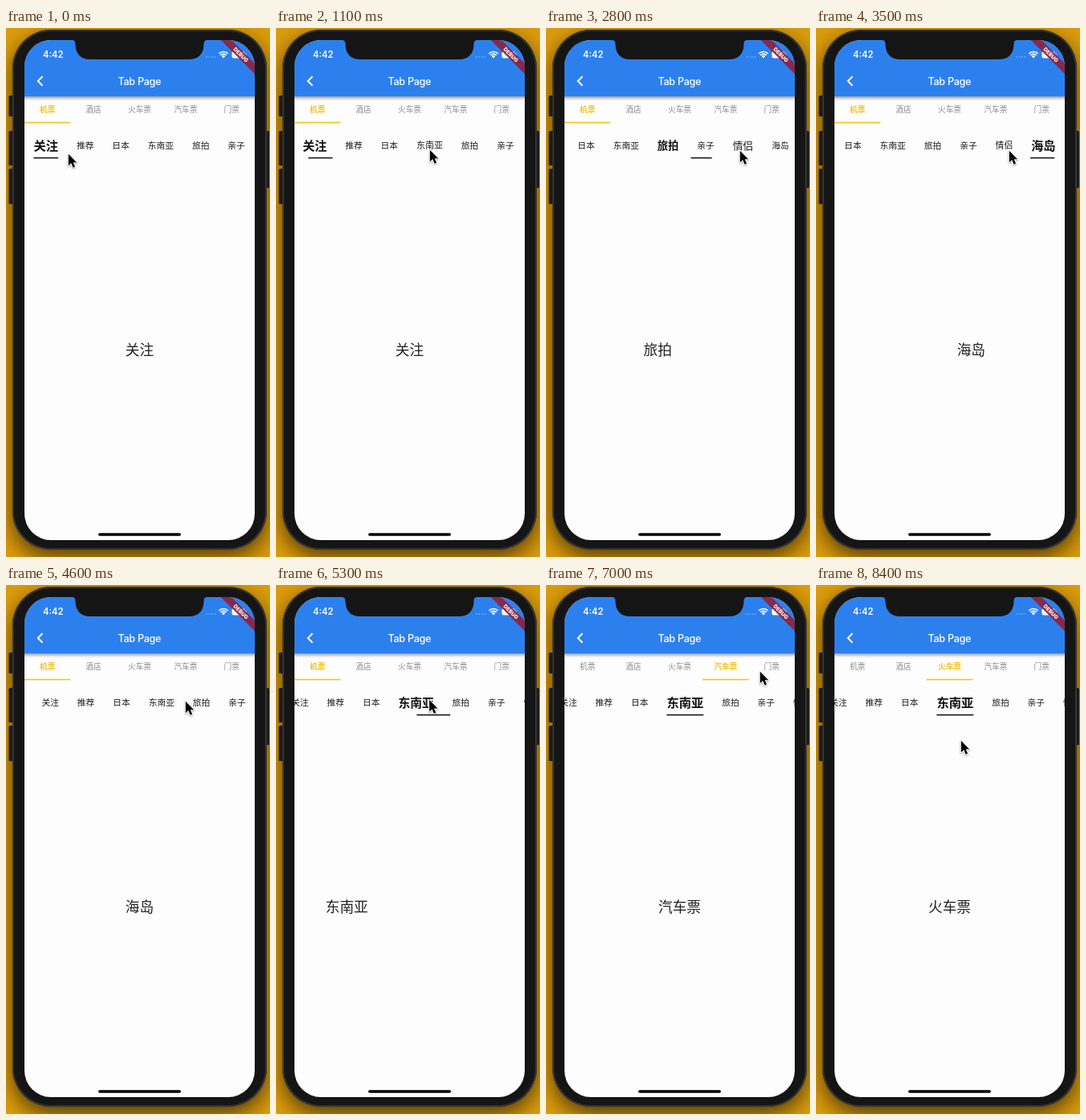
These frames come from a looping animation (329x658 px, 8500 ms). An HTML page with a canvas:

```html
<!DOCTYPE html>
<html lang="zh-CN">
<head>
<meta charset="utf-8">
<title>Tab Page</title>
<style>
html, body { margin: 0; width: 100%; height: 100%; overflow: hidden; background: #d4950c; }
canvas { display: block; width: 329px; height: 658px; }
</style>
</head>
<body>
<canvas id="stage"></canvas>
<script>
const W = 329, H = 658, LOOP = 8500, STEP = 100;
const canvas = document.getElementById('stage');
const ctx = canvas.getContext('2d');
const dpr = window.devicePixelRatio || 1;
canvas.width = W * dpr;
canvas.height = H * dpr;

const CJK = '"Noto Sans CJK SC", "Noto Sans CJK", sans-serif';
const LATIN = 'Inter, Roboto, sans-serif';
const SCREEN = { x: 23, y: 15, w: 287, h: 622, r: 33 };
const MID = SCREEN.x + SCREEN.w / 2;
const TOP = ['机票', '酒店', '火车票', '汽车票', '门票'];
const SUB = ['关注', '推荐', '日本', '东南亚', '旅拍', '亲子', '情侣', '海岛'];
const PAD = 11.45, SMALL = 10.75, BIG = 15.3;
const DURATION = 300, PAGE_LAG = 50;

const taps = [
  { t: 1080, bar: 'sub', i: 3 },
  { t: 2180, bar: 'sub', i: 4 },
  { t: 2720, bar: 'sub', i: 6 },
  { t: 3260, bar: 'sub', i: 7 },
  { t: 5120, bar: 'sub', i: 3 },
  { t: 5795, bar: 'top', i: 2 },
  { t: 6450, bar: 'top', i: 3 },
  { t: 7220, bar: 'top', i: 4 },
  { t: 7790, bar: 'top', i: 2 }
];

// time, x, y
const pointer = [
  [0, 77, 156], [300, 80, 156], [950, 190, 151], [1250, 192, 151],
  [1900, 236, 151], [2100, 237, 151], [2800, 241, 152], [3150, 272, 152],
  [3270, 270, 152], [3500, 240, 152], [4050, 126, 149], [4150, 125, 149],
  [4600, 223, 144], [4750, 223, 145], [5050, 194, 148], [5200, 193, 147],
  [5700, 167, 102], [5850, 168, 101], [6100, 198, 97], [6400, 222, 102],
  [6550, 224, 103], [7000, 266, 107], [7150, 278, 106], [7300, 277, 106],
  [7700, 170, 104], [7900, 168, 106], [8300, 180, 190], [8400, 180, 193], [8500, 180, 193]
];

const clamp = (v, a, b) => Math.min(b, Math.max(a, v));
const lerp = (a, b, p) => a + (b - a) * p;
const smooth = p => p * p * (3 - 2 * p);
const bez = (a, b, s) => 3 * a * s * (1 - s) ** 2 + 3 * b * s * s * (1 - s) + s ** 3;

function ease(x) {
  if (x <= 0) return 0;
  if (x >= 1) return 1;
  let lo = 0, hi = 1;
  for (let n = 0; n < 20; n++) {
    const m = (lo + hi) / 2;
    if (bez(.25, .25, m) < x) lo = m; else hi = m;
  }
  return bez(.1, 1, lo);
}

// Left edges and sizes of the scrolling tabs for given selection weights
function layout(weight) {
  let x = 0;
  return SUB.map((text, i) => {
    const size = lerp(SMALL, BIG, weight(i));
    const w = size * text.length + PAD * 2;
    const tab = { text, x, w, size };
    x += w;
    return tab;
  });
}
const extent = tabs => tabs[tabs.length - 1].x + tabs[tabs.length - 1].w;
const maxScroll = layout(i => i === SUB.length - 1 ? 1 : 0);
const END = extent(maxScroll) - SCREEN.w;

const dragStart = 4150, dragEnd = 4600, settleEnd = 4920;

(function prepare() {
  const at = { sub: 0, top: 0 };
  let scroll = 0, page = SUB[0];
  for (const tap of taps) {
    tap.prev = at[tap.bar];
    tap.dir = Math.sign(tap.i - tap.prev);
    tap.fromText = page;
    page = tap.text = (tap.bar === 'sub' ? SUB : TOP)[tap.i];
    if (tap.bar === 'sub') {
      if (tap.t > dragEnd) scroll = 0;
      const tabs = layout(i => i === tap.prev ? 1 : 0);
      const goal = tabs[tap.i].x + tabs[tap.i].w / 2 - SCREEN.w / 2;
      tap.from = scroll;
      tap.to = scroll = clamp(goal, 0, END);
    }
    at[tap.bar] = tap.i;
  }
})();

const lastTap = (t, bar) => taps.filter(k => k.t <= t && (!bar || k.bar === bar)).pop();

function selection(t, bar) {
  const tap = lastTap(t, bar);
  if (!tap) return { prev: 0, i: 0, p: 1 };
  return { prev: tap.prev, i: tap.i, p: ease((t - tap.t) / DURATION), tap };
}

function scrollAt(t, sel) {
  if (t >= dragStart && t < 5120) {
    if (t <= dragEnd) return lerp(END, -10, smooth((t - dragStart) / (dragEnd - dragStart)));
    return lerp(-10, 0, ease((t - dragEnd) / (settleEnd - dragEnd)));
  }
  return sel.tap ? lerp(sel.tap.from, sel.tap.to, sel.p) : 0;
}

function pointerAt(t) {
  const n = Math.max(1, pointer.findIndex(k => k[0] > t));
  const a = pointer[n - 1], b = pointer[n];
  const p = smooth((t - a[0]) / (b[0] - a[0]));
  return [lerp(a[1], b[1], p), lerp(a[2], b[2], p)];
}

function box(x, y, w, h, r, fill) {
  ctx.beginPath();
  ctx.roundRect(x, y, w, h, r);
  ctx.fillStyle = fill;
  ctx.fill();
}

function label(text, x, y, size, color, weight = 400, family = CJK, align = 'center') {
  ctx.font = `${weight} ${size}px ${family}`;
  ctx.textAlign = align;
  ctx.fillStyle = color;
  ctx.fillText(text, x, y + size * (family === CJK ? .38 : .36));
}

function drawPhone() {
  ctx.fillStyle = '#dc9c0c';
  ctx.fillRect(0, 0, W, H);
  ctx.save();
  ctx.shadowColor = 'rgba(0,0,0,.62)';
  ctx.shadowBlur = 26 * dpr;
  ctx.shadowOffsetY = 9 * dpr;
  box(8, 2, 317, 647, 48, '#2b2b2a');
  ctx.restore();
  for (const [y, h] of [[84, 26], [128, 43], [175, 44]]) box(3.5, y, 6, h, 1.5, '#1d1b18');
  box(323, 128, 5, 71, 1.5, '#1d1b18');
  box(8, 2, 317, 647, 48, '#343433');
  box(10, 4, 313, 643, 46, '#151515');
}

function drawStatus() {
  label('4:42', 46, 33, 11.2, '#fff', 600, LATIN, 'left');
  for (let i = 0; i < 4; i++) box(249 + i * 3.5, 35, 2, 2, 1, 'rgba(255,255,255,.3)');
  ctx.strokeStyle = '#fff';
  ctx.lineWidth = 1.7;
  for (const r of [8, 5.2]) {
    ctx.beginPath();
    ctx.arc(271, 37.5, r, -Math.PI * .75, -Math.PI * .25);
    ctx.stroke();
  }
  ctx.beginPath();
  ctx.moveTo(271, 37.5);
  ctx.arc(271, 37.5, 3.2, -Math.PI * .75, -Math.PI * .25);
  ctx.fillStyle = '#fff';
  ctx.fill();
  box(281.5, 29, 16, 8.5, 2.2, '#fff');
  box(298.3, 31.5, 1.2, 3.4, .6, '#fff');
}

function drawBanner() {
  ctx.save();
  ctx.translate(SCREEN.x + SCREEN.w, SCREEN.y + 1);
  ctx.rotate(Math.PI / 4);
  ctx.fillStyle = 'rgba(140,36,66,.94)';
  ctx.fillRect(-45, 19.8, 90, 9.4);
  label('DEBUG', 0, 24.4, 6.6, '#fff', 800, LATIN);
  ctx.restore();
}

function drawHeader() {
  ctx.save();
  ctx.shadowColor = 'rgba(0,0,0,.45)';
  ctx.shadowBlur = 4 * dpr;
  ctx.shadowOffsetY = 1.5 * dpr;
  ctx.fillStyle = '#2c80ee';
  ctx.fillRect(SCREEN.x - 5, SCREEN.y, SCREEN.w + 10, 70);
  ctx.restore();
  drawStatus();
  ctx.letterSpacing = '-0.3px';
  label('Tab Page', MID - .2, 66, 12.6, '#fff', 500, LATIN);
  ctx.letterSpacing = '0px';
  ctx.beginPath();
  ctx.moveTo(45.5, 60.3);
  ctx.lineTo(39.8, 66);
  ctx.lineTo(45.5, 71.7);
  ctx.strokeStyle = '#fff';
  ctx.lineWidth = 2;
  ctx.stroke();
}

function drawTopTabs(t) {
  const { prev, i, p } = selection(t, 'top');
  const w = SCREEN.w / TOP.length;
  TOP.forEach((text, n) => {
    const on = n === (p > .5 ? i : prev);
    label(text, SCREEN.x + w * (n + .5), 101, 9.75, on ? '#f5c21c' : '#8c8c8c', on ? 700 : 400);
  });
  ctx.fillStyle = '#f5c21c';
  ctx.fillRect(SCREEN.x + w * lerp(prev, i, p), 116.8, w, 1.6);
}

function drawSubTabs(t) {
  const sel = selection(t, 'sub');
  const { prev, i, p } = sel;
  const tabs = layout(n => (n === i ? p : 0) + (n === prev && prev !== i ? 1 - p : 0));
  const left = SCREEN.x - scrollAt(t, sel);
  tabs.forEach((tab, n) => {
    const on = n === (p > .5 ? i : prev);
    label(tab.text, left + tab.x + tab.w / 2, 146, tab.size, on ? '#111' : '#1c1c1c', on ? 700 : 400);
  });
  const a = tabs[prev], b = tabs[i];
  const x = lerp(a.x, b.x, p) + PAD;
  ctx.fillStyle = '#151515';
  ctx.fillRect(left + x, 160.8, lerp(a.w, b.w, p) - PAD * 2, 1.6);
}

function drawPage(t) {
  const tap = lastTap(t);
  const show = (text, x) => label(text, x, 400.5, 17.7, '#222');
  if (!tap) return show(SUB[0], MID);
  const rest = 1 - ease((t - tap.t - PAGE_LAG) / DURATION);
  show(tap.text, MID + tap.dir * SCREEN.w * rest);
  if (rest > 0) show(tap.fromText, MID - tap.dir * SCREEN.w * (1 - rest));
}

function drawNotch() {
  ctx.beginPath();
  ctx.moveTo(82, 14);
  ctx.lineTo(82, 15);
  ctx.quadraticCurveTo(86.5, 15, 86.5, 20);
  ctx.bezierCurveTo(86.5, 32, 93, 39, 105, 39);
  ctx.lineTo(228, 39);
  ctx.bezierCurveTo(240, 39, 246.5, 32, 246.5, 20);
  ctx.quadraticCurveTo(246.5, 15, 251, 15);
  ctx.lineTo(251, 14);
  ctx.fillStyle = '#151515';
  ctx.fill();
}

function drawPointer(t) {
  const [x, y] = pointerAt(t);
  ctx.save();
  ctx.translate(x, y);
  ctx.beginPath();
  ctx.moveTo(.8, .8);
  for (const [px, py] of [[.8, 15.2], [4.2, 12.1], [6.6, 17.7], [9.1, 16.6], [6.7, 11.2], [11.2, 11.2]]) ctx.lineTo(px, py);
  ctx.closePath();
  ctx.shadowColor = 'rgba(0,0,0,.35)';
  ctx.shadowBlur = 2 * dpr;
  ctx.shadowOffsetY = dpr;
  ctx.strokeStyle = '#fff';
  ctx.lineWidth = 2;
  ctx.lineJoin = 'round';
  ctx.stroke();
  ctx.shadowColor = 'transparent';
  ctx.fillStyle = '#000';
  ctx.fill();
  ctx.restore();
}

function draw(t) {
  ctx.setTransform(dpr, 0, 0, dpr, 0, 0);
  drawPhone();
  ctx.save();
  ctx.beginPath();
  ctx.roundRect(SCREEN.x, SCREEN.y, SCREEN.w, SCREEN.h, SCREEN.r);
  ctx.clip();
  ctx.fillStyle = '#fdfdfd';
  ctx.fillRect(SCREEN.x, SCREEN.y, SCREEN.w, SCREEN.h);
  drawHeader();
  drawTopTabs(t);
  drawSubTabs(t);
  drawPage(t);
  drawBanner();
  box(115, 628.2, 103, 3.6, 1.8, '#000');
  ctx.restore();
  drawNotch();
  drawPointer(t);
}

const start = performance.now();
function tick() {
  const t = (performance.now() - start) % LOOP;
  draw(Math.floor(t / STEP) * STEP);
  requestAnimationFrame(tick);
}
tick();
</script>
</body>
</html>
```
